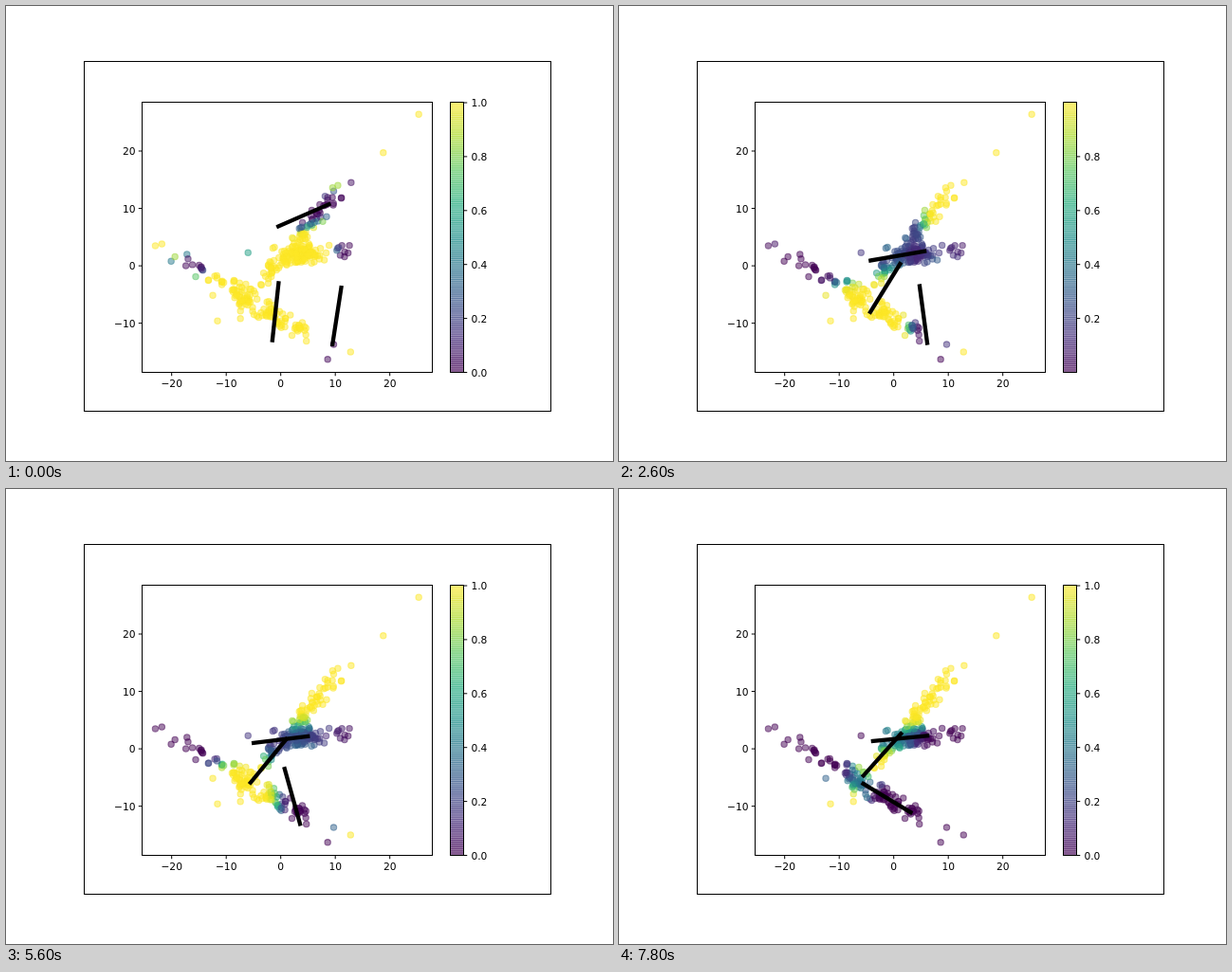
An HTML page for the animation above (8 s loop, 640 px wide and 480 px high).

```html
<!DOCTYPE html>
<html lang="en">
<head>
<meta charset="utf-8">
<title>Fitting three lines</title>
<style>
  html, body { margin: 0; width: 100%; height: 100%; overflow: hidden; background: #fff; }
  svg { display: block; width: 640px; height: 480px; }
  text { font: 10.7px "DejaVu Sans", Verdana, sans-serif; fill: #000; }
  .frame { fill: none; stroke: #000; }
  .dots circle { fill-opacity: .5; stroke-opacity: .5; stroke-width: 1.07; }
  .fits line { stroke: #000; stroke-width: 4.3; stroke-linecap: square; }
</style>
</head>
<body>
<svg viewBox="0 0 640 480">
  <defs>
    <linearGradient id="scale" gradientUnits="userSpaceOnUse" x1="0" y1="386.5" x2="0" y2="101.5"></linearGradient>
  </defs>
  <rect class="frame" x="82.5" y="58.5" width="492" height="369"/>
  <g class="dots"></g>
  <g class="fits"></g>
  <rect x="468.5" y="101.5" width="14" height="285" fill="url(#scale)" opacity=".55"/>
  <path d="M475.5 101.5V386.5" stroke="url(#scale)" stroke-width="14" stroke-dasharray="1.11 1.11" opacity=".5"/>
  <g class="frame" id="axes">
    <rect x="143.5" y="101.5" width="306" height="285"/>
    <rect x="468.5" y="101.5" width="14" height="285"/>
  </g>
</svg>
<script>
const STEP = 200, LOOP = 8000;
const $ = q => document.querySelector(q);
const px = x => 289.7 + x * 5.75;
const py = y => 274.1 - y * 6.055;

function add(parent, tag, attrs, text) {
  const el = document.createElementNS('http://www.w3.org/2000/svg', tag);
  for (const k in attrs) el.setAttribute(k, attrs[k]);
  if (text) el.textContent = text;
  parent.appendChild(el);
  return el;
}

// Viridis
const viridis = ['440154', '472d7b', '3b528b', '2c728e', '21918c', '28ae80', '5ec962', 'addc30', 'fde725']
  .map(h => [0, 2, 4].map(i => parseInt(h.substr(i, 2), 16)));

function colour(v) {
  const p = v * 8, i = Math.min(7, Math.floor(p));
  return `rgb(${viridis[i].map((a, k) => Math.round(a + (viridis[i + 1][k] - a) * (p - i)))})`;
}
viridis.forEach((c, i) => add($('#scale'), 'stop', { offset: i / 8, 'stop-color': `rgb(${c})` }));

// Ticks and labels
function mark(d, text, x, y, anchor) {
  const g = add($('svg'), 'g', {});
  add(g, 'path', { d, class: 'frame' });
  add(g, 'text', { x, y, 'text-anchor': anchor }, text);
  return g;
}
for (let n = -20; n <= 20; n += 10) {
  const s = String(n).replace('-', '\u2212'), x = px(n), y = py(n);
  mark(`M${x} 386.5v3.75`, s, x, 402.3, 'middle');
  if (n > -20) mark(`M143.5 ${y}h-3.75`, s, 136.6, y + 4, 'end');
}
const levels = [0, 1, 2, 3, 4, 5].map(i => {
  const y = 386.5 - i * 56.9;
  return mark(`M482.5 ${y}h3.75`, (i / 5).toFixed(1), 490.4, y + 4, 'start');
});

// Seeded, bounded bell-shaped noise with unit deviation
let seed = 11;
function rand() {
  seed = (seed * 16807) % 2147483647;
  return seed / 2147483647;
}
const bell = () => 2 * (rand() + rand() + rand() - 1.5);

// Point clouds: count, centre, angle, spread along and across
const clouds = [
  [6, -14.2, -.6, -50, .7, .35],
  [9, -12.1, -2.5, -15, 1, .35],
  [58, -7.2, -5.3, -32, 1.9, 1],
  [42, -1.4, -8.6, -32, 1.6, .85],
  [15, 3.5, -10.6, 30, .9, .6],
  [26, -2.2, -1.2, 47, 1.7, .6],
  [115, 3.7, 2.1, 6, 2.3, .85],
  [24, 3.6, 5, 50, 1, .7],
  [17, 6.2, 8.2, 50, 1.2, .4],
  [20, 8.9, 11, 60, 1.6, .9],
  [9, 11.2, 2.7, -20, .9, .6]
];
const lone = [
  [25.3, 26.4], [18.8, 19.7], [12.9, 14.5], [-23, 3.5], [-21.8, 3.8], [-20.1, .8], [-19.4, 1.6],
  [-17.4, 0], [-17.2, 2], [-17, 1.2], [-16.2, .2], [-15.6, -1.9], [12.8, -15], [8.6, -16.3],
  [9.7, -13.7], [4.7, -13.1], [4.6, -12], [-11.6, -9.6], [-7.4, -9.2], [-6, 2.3]
];

const dots = [];
function dot(x, y) {
  dots.push({ x, y, el: add($('.dots'), 'circle', { cx: px(x), cy: py(y), r: 3.2 }) });
}
for (const [n, cx, cy, deg, along, across] of clouds) {
  const c = Math.cos(deg * Math.PI / 180), s = Math.sin(deg * Math.PI / 180);
  for (let i = 0; i < n; i++) {
    const u = bell() * along, v = bell() * across;
    dot(cx + u * c - v * s, cy + u * s + v * c);
  }
}
lone.forEach(p => dot(...p));

// Key poses of each line: step, centre, angle, deviation of its points
const tracks = [
  [[0, -.97, -7.99, 83.5, 45], [4, -2.38, -5.56, 56.7, 6], [13, -1.57, -3.86, 57, 4.5],
    [31, -2.41, -1.76, 47.6, 3.5], [39, -2.12, -1.02, 46.7, 1.6]],
  [[0, 4.18, 8.79, 22.6, .7], [4, 5.05, 4.7, 16.9, 1.1], [13, .7, 1.73, 9.2, 1.3],
    [19, 0, 1.6, 7.9, 1.3], [31, 0, 1.61, 6, 1.2], [39, 1.18, 1.82, 5.2, 1]],
  [[0, 10.29, -8.74, 80.8, .7], [4, 8.14, -8.24, 92.8, 1.5], [13, 5.44, -8.49, 98, 1.1],
    [24, 3.2, -8.28, 94.9, 1.3], [31, 1.31, -8.28, 115, 1.2], [39, -1.25, -8.57, 150.2, .9]]
];
const fits = tracks.map(() => add($('.fits'), 'line', {}));

function lineAt(keys, step) {
  let i = 0;
  while (i < keys.length - 2 && step >= keys[i + 1][0]) i++;
  const a = keys[i], b = keys[i + 1], u = (step - a[0]) / (b[0] - a[0]);
  const mix = k => a[k] + (b[k] - a[k]) * u;
  const turn = mix(3) * Math.PI / 180;
  return {
    x: mix(1), y: mix(2), c: Math.cos(turn), s: Math.sin(turn),
    dev: a[4] * Math.pow(b[4] / a[4], u)
  };
}

// Normal density of a point's distance from a line
function density(line, p) {
  const d = ((p.y - line.y) * line.c - (p.x - line.x) * line.s) / line.dev;
  return Math.exp(-d * d / 2) / line.dev + 1e-200;
}

function draw(step) {
  const lines = tracks.map(keys => lineAt(keys, step));
  lines.forEach((l, i) => {
    const ends = { x1: px(l.x - 5 * l.c), y1: py(l.y - 5 * l.s), x2: px(l.x + 5 * l.c), y2: py(l.y + 5 * l.s) };
    for (const k in ends) fits[i].setAttribute(k, ends[k]);
  });
  // A dot's colour is its share in the first line
  for (const p of dots) {
    const [a, b, c] = lines.map(l => density(l, p));
    const col = colour(a / (a + b + c));
    p.el.setAttribute('fill', col);
    p.el.setAttribute('stroke', col);
  }
  const show = (el, on) => el.setAttribute('visibility', on ? 'visible' : 'hidden');
  show(levels[0], step < 2 || step > 26);
  show(levels[5], step < 2 || step > 21);
}

const start = performance.now();
let shown = -1;
function tick() {
  const step = Math.floor((performance.now() - start) % LOOP / STEP);
  if (step !== shown) draw(shown = step);
  requestAnimationFrame(tick);
}
tick();
</script>
</body>
</html>
```
